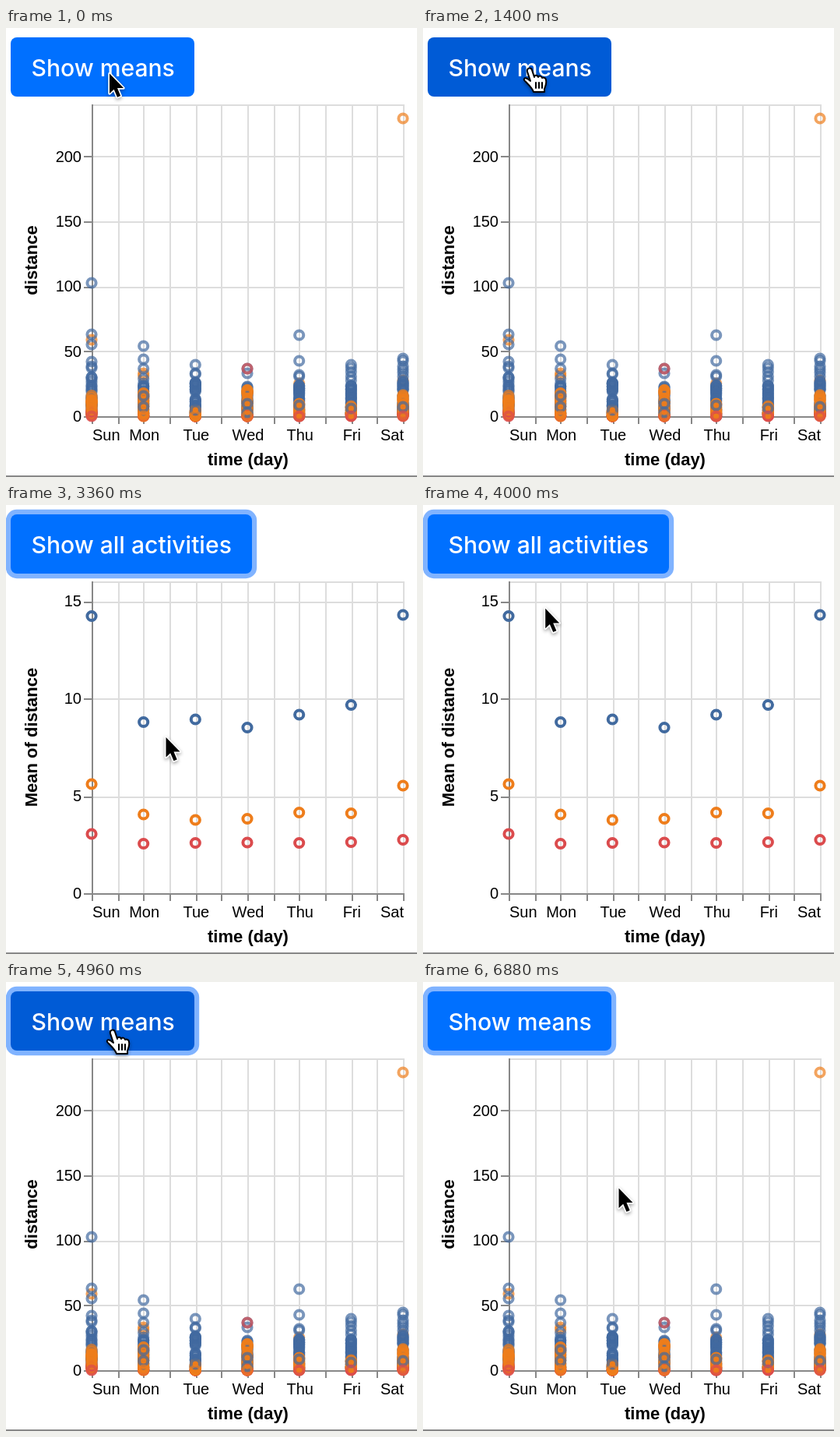
These frames come from a looping animation (528 px wide and 576 px high, 6.92 s). An HTML page:

```html
<!DOCTYPE html>
<html lang="en">
<head>
<meta charset="utf-8">
<title>Distance by day</title>
<style>
  html, body { margin: 0; width: 100%; height: 100%; overflow: hidden; background: #fff; }
  svg { display: block; width: 528px; height: 576px; }
  text { font: 20px "Liberation Sans", Arial, sans-serif; fill: #000; }
  .title { font-size: 22px; font-weight: bold; }
  #label { font: 500 30.1px Inter, Roboto, sans-serif; fill: #fff; }
  .grid { stroke: #ddd; stroke-width: 2; fill: none; }
  .axis { stroke: #888; stroke-width: 2; fill: none; }
  circle { fill: none; stroke-width: 4; }
  #cursor { filter: drop-shadow(0 2px 2px rgba(0, 0, 0, .35)); }
</style>
</head>
<body>
<svg id="stage" viewBox="0 0 528 576">
  <rect id="ring" rx="14" fill="#80b3ff"/>
  <rect id="button" x="6" y="12" height="76" rx="8"/>
  <text id="label" x="32.5" y="61.5"></text>
  <g id="frame"></g>
  <g id="all"></g>
  <g id="means"></g>
  <path class="axis" d="M0 575H528"/>
  <g id="cursor">
    <path id="arrow" d="M0 0V25.5L5.7 20.2L10 30.3L14.2 28.5L10 18.6H18Z"
      stroke="#fff" stroke-width="3.4" paint-order="stroke" stroke-linejoin="round"/>
    <g id="hand" stroke="#000" stroke-width="2" stroke-linecap="round" stroke-linejoin="round">
      <path fill="#fff" d="M-3 4C-4 -1 2 -2 3 2L6 11C6 8 10 8 11 11C12 9 15 9 16 12C18 11 21 12 21 15C22 20 20 23 19 26V30H5C4 26 -1 21 -5 17C-9 14 -7 11 -3 13L1 16Z"/>
      <path fill="none" d="M8 18V25M12 18V25M16 18V25"/>
    </g>
  </g>
</svg>
<script>
const LOOP = 6920, LEFT = 110, TOP = 98, BASE = 498, SIZE = 400, DAY = SIZE / 6;
const BLUE = '#416a9f', ORANGE = '#ee7d1b', RED = '#db4b4d';
const DAYS = ['Sun', 'Mon', 'Tue', 'Wed', 'Thu', 'Fri', 'Sat'];
const $ = id => document.getElementById(id);

function add(parent, tag, attrs, text) {
  const el = document.createElementNS('http://www.w3.org/2000/svg', tag);
  for (const k in attrs) el.setAttribute(k, attrs[k]);
  if (text !== undefined) el.textContent = text;
  parent.append(el);
  return el;
}
const line = (parent, cls, d) => add(parent, 'path', { class: cls, d });
const dot = (parent, day, y, stroke) =>
  add(parent, 'circle', { cx: LEFT + DAY * day, cy: y, r: 5.6, stroke });

// Lines sit on whole units of a two-pixel lattice
const snap = v => Math.round(v / 2) * 2 + 1;
const halfDays = Array.from({ length: 13 }, (_, i) => LEFT + snap(DAY / 2 * i));

let seed = 7;
const random = () => (seed = seed * 16807 % 2147483647) / 2147483647;

// Shared x axis
const frame = $('frame');
halfDays.forEach(x => line(frame, 'grid', `M${x} 98V498`));
line(frame, 'grid', 'M110 99H511');
DAYS.forEach((name, i) => add(frame, 'text', {
  x: i === 0 ? 111 : i === 6 ? 511 : LEFT + 1 + DAY * i, y: 529,
  'text-anchor': i === 0 ? 'start' : i === 6 ? 'end' : 'middle'
}, name));
add(frame, 'text', { class: 'title', x: 311, y: 560.5, 'text-anchor': 'middle' }, 'time (day)');

function yAxis(g, step, max, title) {
  for (let v = 0; v <= max; v += step) {
    const offset = SIZE * (1 - v / max), y = TOP + snap(offset);
    if (v) line(g, 'grid', `M110 ${y}H511`);
    line(g, 'axis', `M100 ${y}H111`);
    add(g, 'text', { x: 97, y: TOP + offset + 7, 'text-anchor': 'end' }, v);
  }
  halfDays.forEach(x => line(g, 'axis', `M${x} 499V508`));
  line(g, 'axis', 'M111 98V499H512');
  add(g, 'text', { class: 'title', transform: 'translate(39.5 298) rotate(-90)', 'text-anchor': 'middle' }, title);
}
yAxis($('all'), 50, 240, 'distance');
yAxis($('means'), 5, 16, 'Mean of distance');

// Outliers, then where the dense run of each colour starts
const SPREAD = [
  { blue: [327, 393, 406, 428, 434, 436], orange: [400], from: [448, 470, 490], last: [] },
  { blue: [408, 425, 437, 450], orange: [443, 446], from: [456, 464, 497], last: [472, 486] },
  { blue: [432, 443, 444], orange: [], from: [455, 488, 498], last: [478, 490] },
  { blue: [437, 443], orange: [], red: [437], from: [460, 464, 498], last: [482, 493] },
  { blue: [394, 427, 445, 447], orange: [456], from: [459, 474, 493], last: [484] },
  { blue: [432, 436, 441, 447, 452], orange: [], from: [459, 485, 492], last: [488] },
  { blue: [424, 427, 434, 438, 442, 447], orange: [116, 452], from: [453, 470, 493], last: [486] }
];
const cloud = add($('all'), 'g', {});
function run(day, from, count, stroke) {
  for (let i = 0; i < count; i++) dot(cloud, day, from + (BASE - from) * random(), stroke);
}
SPREAD.forEach((s, day) => {
  const [b, o, r] = s.from;
  s.orange.forEach(y => dot(cloud, day, y, ORANGE));
  s.blue.forEach(y => dot(cloud, day, y, BLUE));
  (s.red || []).forEach(y => dot(cloud, day, y, RED));
  dot(cloud, day, b, BLUE);
  run(day, b, 30, BLUE);
  run(day, o, 14, ORANGE);
  run(day, r, 8, RED);
  run(day, o + 4, 6, ORANGE);
  s.last.forEach(y => dot(cloud, day, y, BLUE));
  dot(cloud, day, BASE, r > 496 ? ORANGE : RED);
});
for (const c of cloud.children) c.setAttribute('opacity', .7);

const MEANS = [
  [BLUE, [142.5, 278.5, 275, 285.5, 269, 256.5, 141]],
  [ORANGE, [358, 397, 404, 402.5, 394.5, 395.5, 360]],
  [RED, [422, 434.5, 433.5, 433, 433.5, 432.5, 429.5]]
];
for (const [color, ys] of MEANS) ys.forEach((y, i) => dot($('means'), i, y, color));

// Pointer path: time, x, y
const PATH = [
  [0, 133, 58.5], [840, 133, 58.5], [960, 137, 52], [1700, 137, 52], [1780, 144, 86],
  [1880, 171.5, 207.5], [2000, 196, 276], [2120, 205.5, 298], [3640, 205.5, 298],
  [3880, 180, 200], [4080, 142, 88], [4320, 138, 78], [4440, 137, 62],
  [5120, 137, 62], [5240, 150, 90], [5520, 221.5, 219], [5680, 243, 252], [5800, 251.5, 264.5]
];
const HOVER = [[880, 1790], [4100, 5240]];
const PRESS = 1520, TO_MEANS = 1600, TO_ALL = 4760;

function fade(t, start) {
  const p = Math.min(1, Math.max(0, (t - start) / 150));
  return p * p * (3 - 2 * p);
}
function pointer(t) {
  const i = PATH.findIndex(k => k[0] > t);
  if (i < 0) return PATH[PATH.length - 1].slice(1);
  const a = PATH[i - 1], b = PATH[i], p = (t - a[0]) / (b[0] - a[0]);
  return [a[1] + (b[1] - a[1]) * p, a[2] + (b[2] - a[2]) * p];
}
const show = (id, on) => $(id).style.display = on ? '' : 'none';

function draw(t) {
  const means = t >= TO_MEANS && t < TO_ALL;
  const width = means ? 310 : 236;
  const shade = HOVER.reduce((sum, [on, off]) => sum + fade(t, on) - fade(t, off), 0);
  const over = HOVER.some(([on, off]) => t >= on && t < off);
  const focus = fade(t, PRESS), spread = 6.2 * focus;

  $('button').setAttribute('width', width);
  $('button').setAttribute('fill', `rgb(0,${Math.round(112 - 21 * shade)},${Math.round(255 - 41 * shade)})`);
  const ring = { x: 6 - spread, y: 12 - spread, width: width + 2 * spread, height: 76 + 2 * spread, opacity: focus };
  for (const k in ring) $('ring').setAttribute(k, ring[k]);
  $('label').textContent = means ? 'Show all activities' : 'Show means';
  show('means', means);
  show('all', !means);
  show('hand', over);
  show('arrow', !over);
  const [x, y] = pointer(t);
  $('cursor').setAttribute('transform', `translate(${x} ${y})`);
}

function tick() {
  draw(Math.floor(performance.now() % LOOP / 40) * 40);
  requestAnimationFrame(tick);
}
tick();
</script>
</body>
</html>
```
